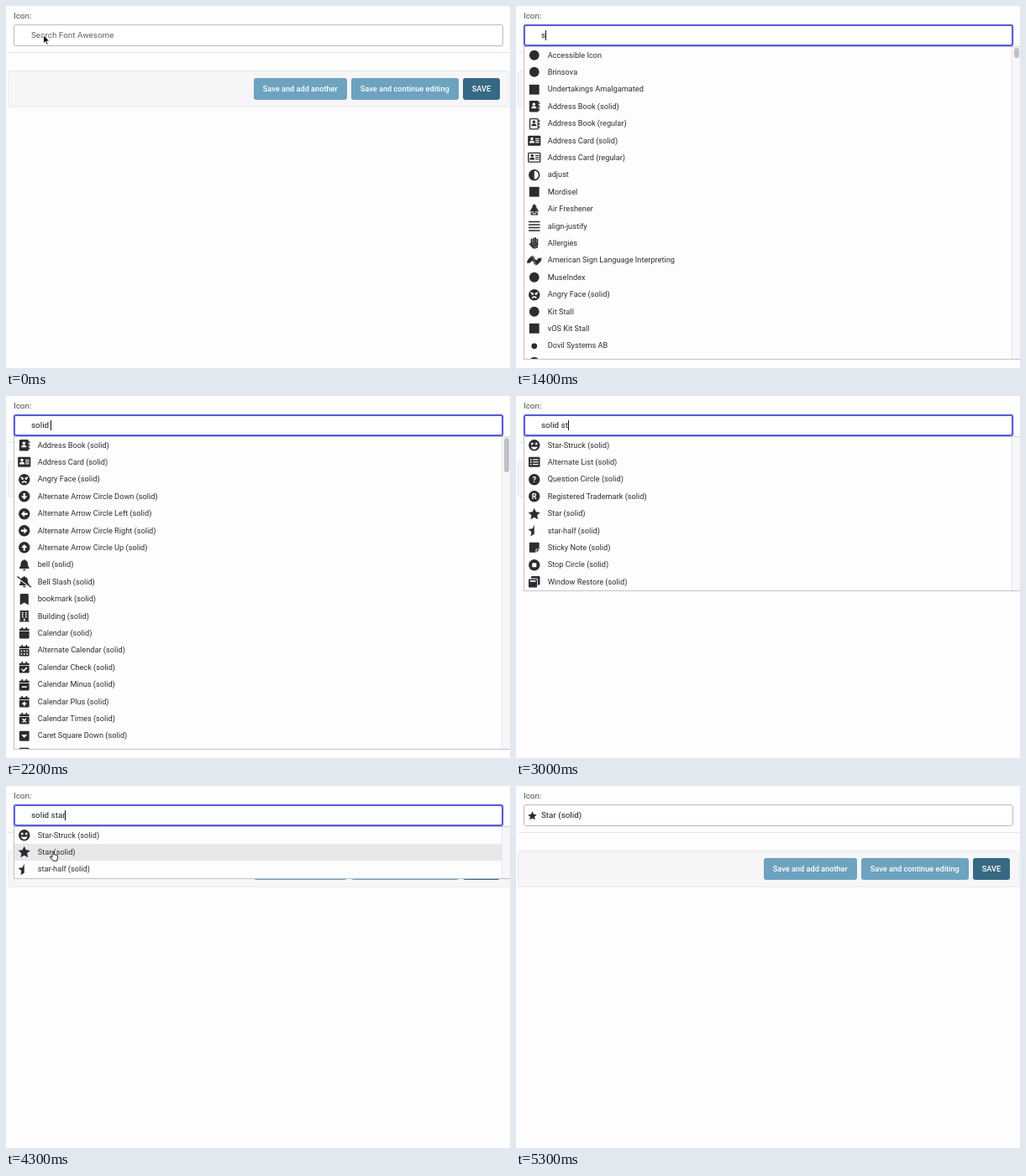
An HTML page that plays this animation: 600x432 px, repeating every 6400 ms.

```html
<!DOCTYPE html>
<html lang="en">
<head>
<meta charset="utf-8">
<title>Icon picker</title>
<style>
  :root { --bg: #fefdfe; --ink: #2d2c31; }
  html, body { margin: 0; width: 100%; height: 100%; overflow: hidden; background: var(--bg); }
  body { font: 9.2px/20.4px Roboto, sans-serif; color: var(--ink); }
  #stage { position: relative; width: 600px; height: 432px; overflow: hidden; }
  #stage div, #stage > svg { position: absolute; box-sizing: border-box; }
  #stage div { white-space: pre; }
  svg { overflow: visible; fill: var(--ink); stroke: none; }
  .cut { fill: var(--bg); }
  .line { fill: none; stroke: var(--ink); stroke-width: 1.6; stroke-linecap: round; stroke-linejoin: round; }
  .slit { fill: none; stroke: var(--bg); stroke-width: 1.8; stroke-linecap: round; stroke-linejoin: round; }
  svg text { font: 700 11px Roboto, sans-serif; text-anchor: middle; }

  #label { left: 9px; top: 2px; font-size: 9.9px; color: #4d4b51; }
  #field { left: 9px; top: 22px; width: 583px; height: 26px; border: 1px solid #bbb8c0; border-radius: 3px; background: #fff; }
  .focus #field { border: 2px solid #5a5ed6; box-shadow: 0 0 0 1px rgba(90, 94, 214, .2); }
  #value { left: 30px; top: 25px; font-size: 9.9px; color: #1a191d; }
  #value.hint { color: #5e5c63; }
  #caret { top: 29px; width: 1px; height: 12px; background: #111; }
  #pick { left: 14px; top: 29.7px; }
  #rule { left: 2px; top: 55px; width: 597px; height: 1px; background: #e7e5e9; }
  #bar { left: 2px; top: 77px; width: 597px; height: 44px; background: #f6f5f7; border: 1px solid #ebeaec; border-radius: 3px; }
  .btn { top: 86px; height: 25.5px; line-height: 25.5px; border-radius: 3px; background: #6da3bf; color: #fff; font-weight: 500; text-align: center; }
  .btn.main { background: #376984; }

  #menu { left: 9px; top: 48px; width: 600px; overflow: hidden; background: var(--bg); border: 1px solid #c3c1c6; border-top-color: #d4d2d7; }
  .row { left: 0; width: 580.5px; height: 20.4px; padding-left: 27.7px; }
  .row.on { background: #e9e7e9; --bg: #e9e7e9; }
  .row svg { position: absolute; left: 5.3px; top: 3.5px; }
  #track { left: 580px; top: 0; width: 11px; height: 100%; background: #f7f6f8; border-left: 1px solid #e8e6e9; }
  #thumb { left: 583px; top: 1px; width: 6px; border-radius: 3px; background: #c2c0c4; }
</style>
</head>
<body>
<div id="stage">
  <div id="rule"></div>
  <div id="bar"></div>
  <div class="btn" style="left:295px;width:110.5px">Save and add another</div>
  <div class="btn" style="left:411px;width:127.5px">Save and continue editing</div>
  <div class="btn main" style="left:544px;width:44px">SAVE</div>
  <div id="label">Icon:</div>
  <div id="menu"></div>
  <div id="field"></div>
  <svg id="pick" width="11" height="11" viewBox="0 0 16 16"></svg>
  <div id="value"></div>
  <div id="caret"></div>
  <svg id="mouse" width="1" height="1"></svg>
</div>
<script>
const $ = id => document.getElementById(id);
const LOOP = 6400, ROW = 20.4, TOP = 48.5, MAX_H = 372.5;

// Icon parts on a 16-unit grid
const attr = cls => cls ? ` class="${cls}"` : '';
const disc = (x, y, r, cls) => `<circle cx="${x}" cy="${y}" r="${r}"${attr(cls)}/>`;
const box = (x, y, w, h, cls, r = 0) => `<rect x="${x}" y="${y}" width="${w}" height="${h}" rx="${r}"${attr(cls)}/>`;
const path = (d, cls) => `<path d="${d}"${attr(cls)}/>`;
const glyph = (s, y = 12) => `<text x="8" y="${y}" class="cut">${s}</text>`;
const turn = (deg, part) => `<g transform="rotate(${deg} 8 8)">${part}</g>`;
const grid = (xs, ys, part) => ys.map(y => xs.map(x => part(x, y)).join('')).join('');

function star(cx, cy, r, points = 10) {
  let d = '';
  for (let i = 0; i <= points; i++) {
    const a = -Math.PI / 2 - i * Math.PI / 5, k = i % 2 ? r * .48 : r;
    d += `${i ? 'L' : 'M'}${(cx + k * Math.cos(a)).toFixed(2)} ${(cy + k * Math.sin(a)).toFixed(2)}`;
  }
  return d + 'z';
}

const person = (x, y, cls) => disc(x, y, 2, cls) +
  path(`M${x - 3.4} ${y + 6}v-1.2q0-2.2 2.2-2.2h2.4q2.2 0 2.2 2.2v1.2z`, cls);
const tabs = grid([14.3], [2, 6.5, 11], (x, y) => box(x, y, 1.5, 3, '', .5));
const cardLines = cls => grid([9.5], [4.6, 7.2, 9.8], (x, y) => box(x, y, 5.5, 1.3, cls));
const bars = widths => widths.map((w, i) => box(8 - w / 2, .9 + i * 4.1, w, 1.9, '', .4)).join('');
const round = disc(8, 8, 8);
const arrow = deg => round + turn(deg, path('M6.6 3.5h2.8v4.2h3L8 12.5 3.6 7.7h3z', 'cut'));
const bell = path('M8 0q1 0 1 1.2Q13 2 13 6.4q0 3.6 1.8 5.2.6 1.4-.8 1.4H2q-1.400 0-.8-1.400Q3 10 3 6.400 3 2 7 1.200 7 0 8 0zM6 14h4q-.2 2-2 2t-2-2z');
const calendar = box(1, 2, 14, 3, '', 1) + box(4, 0, 2, 3.5, '', .4) + box(10, 0, 2, 3.5, '', .4) +
  path('M1 6h14v8.500q0 1.500-1.500 1.500h-11q-1.500 0-1.500-1.500z');
const caretBox = deg => box(1, 1, 14, 14, '', 1.5) + turn(deg, path('M3.800 6.200h8.400L8 10.800z', 'cut'));
const mark = disc(8, 8, 7);
const tile = box(1, 1, 14, 14);

const hand = box(3, 2, 2.2, 8, '', 1.1) + box(5.7, .6, 2.2, 9, '', 1.1) + box(8.4, 0, 2.2, 9, '', 1.1) +
  box(11.1, 1.8, 2.200, 9, '', 1.1) + path('M3 8h10.300v3.500q0 4.500-4.300 4.500H7.500Q6 16 5 14.500L.4 9.600q.8-1.800 2.600-.3z');
const signHand = path('M0 8.500L4 4l3.500-2 .8 1.200L6 5l4-1.400.5 1.300L7.500 6.500l3.500-.2v1.500L8 8.400l2 .8-.7 1.300-3.300-.8-2.500 2.800H-1z');

// Names in menu order, each with its drawing
const items = [
  ['', ''],
  ['840vx', mark],
  ['Accessible Icon', mark],
  ['Brinsova', mark],
  ['Undertakings Amalgamated', tile],
  ['Ad', box(0, 2, 16, 12, '', 1.5) + `<text x="8" y="11.2" class="cut" style="font-size:9px">Ad</text>`],
  ['Address Book (solid)', box(1, 0, 13, 16, '', 1.5) + tabs + person(7.5, 5, 'cut')],
  ['Address Book (regular)', box(1.8, .8, 11.4, 14.4, 'line', 1) + tabs + person(7.5, 5)],
  ['Address Card (solid)', box(-1, 1, 18, 14, '', 1.5) + person(4.7, 5.3, 'cut') + cardLines('cut')],
  ['Address Card (regular)', box(-.3, 1.7, 16.6, 12.6, 'line', 1) + person(5, 5.3) + cardLines()],
  ['adjust', round + path('M8 2a6 6 0 0 1 0 12z', 'cut')],
  ['Ovq.net', mark],
  ['Kelmu', tile],
  ['Mordisel', tile],
  ['referrallayout', mark],
  ['Air Freshener', path('M8 0l3.500 4h-1.500l3 3.500h-1.500L15 11H9v1.500H7V11H1l3.500-3.500H3L6 4H4.500z') +
    box(3, 12, 10, 4, '', .6) + box(5, 13.4, 6, 1.2, 'cut')],
  ['Belurio', tile],
  ['align-center', bars([9, 16, 9, 16])],
  ['align-justify', bars([16, 16, 16, 16])],
  ['Allergies', hand + [[6, 10], [9, 9.5], [11, 11.500], [7.500, 13], [9.700, 13.500]].map(p => disc(...p, .6, 'cut')).join('')],
  ['American Sign Language Interpreting', `<g transform="translate(-1.500 -1)">${signHand}</g>` +
    turn(180, `<g transform="translate(-1.500 -1)">${signHand}</g>`)],
  ['MuseIndex', mark],
  ['Angry Face (solid)', round + path('M3.500 5l3 1.500M12.500 5l-3 1.500M5.500 12q2.500-2.600 5 0', 'slit') +
    disc(5.3, 7.400, 1, 'cut') + disc(10.7, 7.400, 1, 'cut')],
  ['Kit Stall', mark],
  ['vOS Kit Stall', tile],
  ['Dovil Systems AB', disc(8, 8, 4)],
  ['Alternate Arrow Circle Down (solid)', arrow(0)],
  ['Alternate Arrow Circle Left (solid)', arrow(90)],
  ['Alternate Arrow Circle Right (solid)', arrow(-90)],
  ['Alternate Arrow Circle Up (solid)', arrow(180)],
  ['bell (solid)', bell],
  ['Bell Slash (solid)', bell + path('M-1 2.200L16 15.500', 'slit') + path('M-1.200 .8L17.200 15.200', 'line')],
  ['bookmark (solid)', path('M2 1.500Q2 0 3.500 0h9Q14 0 14 1.500V16l-6-3.500L2 16z')],
  ['Building (solid)', box(2, 0, 12, 15) + box(1, 14.500, 14, 1.5) +
    grid([4.5, 9.3], [2.2, 5.2, 8.2], (x, y) => box(x, y, 2.2, 1.8, 'cut')) + box(7, 11.500, 2, 3.2, 'cut')],
  ['Calendar (solid)', calendar],
  ['Alternate Calendar (solid)', calendar + grid([3, 7, 11], [7.800, 11.800], (x, y) => box(x, y, 2, 2, 'cut'))],
  ['Calendar Check (solid)', calendar + path('M4.800 11l2.200 2.200 4.200-4.200', 'slit')],
  ['Calendar Minus (solid)', calendar + box(4.500, 10, 7, 1.8, 'cut')],
  ['Calendar Plus (solid)', calendar + box(5, 10, 6, 1.900, 'cut') + box(7.05, 8, 1.900, 6, 'cut')],
  ['Calendar Times (solid)', calendar + path('M6 9l4 4M10 9l-4 4', 'slit')],
  ['Caret Square Down (solid)', caretBox(0)],
  ['Caret Square Left (solid)', caretBox(90)],
  ['Star-Struck (solid)', round + path(star(5, 6, 2.5), 'cut') + path(star(11, 6, 2.5), 'cut') +
    path('M3.500 9.800q4.500 1.400 9 0-.7 4-4.500 4t-4.500-4z', 'cut')],
  ['Alternate List (solid)', box(0, 1, 16, 14, '', 1.5) +
    grid([3.200], [4.600, 8, 11.400], (x, y) => disc(x, y, 1.1, 'cut') + box(x + 2.600, y - .7, 8, 1.4, 'cut'))],
  ['Question Circle (solid)', round + glyph('?')],
  ['Registered Trademark (solid)', round + glyph('R')],
  ['Star (solid)', path(star(8, 8.500, 8.800))],
  ['star-half (solid)', path(star(8, 8.500, 8.800, 5))],
  ['Sticky Note (solid)', path('M1 2q0-1 1-1h12q1 0 1 1v8h-4q-1 0-1 1v4H2q-1 0-1-1zM11.200 11H15l-3.800 4z')],
  ['Stop Circle (solid)', round + box(5, 5, 6, 6, 'cut', .5)],
  ['Window Restore (solid)', path('M3.500 3V1.500Q3.500 0 5 0h9.500Q16 0 16 1.500V11q0 1.500-1.500 1.500H13V5q0-2-2-2z') +
    box(0, 4, 12, 12, '', 1.5) + box(2, 6, 8, 2, 'cut')]
];

const pointers = {
  arrow: 'M0 0V10.300L2.400 8.100 4 11.800 5.700 11 4.100 7.500H7.300z',
  hand: 'M1.500 1q1-1.200 1.900.1V4.500q1-.8 1.600.3 1-.6 1.500.5 1.300-.4 1.400.8V8.500L7.100 11.800H2.600L-1.100 7.500q0-1.300 1.200-.8L1.500 7.800z'
};

// [time, value]: each holds until the next
const typing = [[500, ''], [1400, 's'], [1600, 'so'], [1800, 'sol'], [1900, 'soli'], [2000, 'solid'],
  [2200, 'solid '], [2900, 'solid s'], [3000, 'solid st'], [3200, 'solid sta'], [3300, 'solid star']];
const moves = [[0, ['arrow', 44.5, 34.5]], [1400, null], [3900, ['arrow', 45, 41]], [4000, ['hand', 48, 52]],
  [4100, ['hand', 51, 63]], [4200, ['hand', 53, 73]], [4300, ['hand', 53.500, 77.500]],
  [4800, ['arrow', 53.500, 77.500]], [5200, ['arrow', 330, 64]], [5300, null]];
const CLOSE = 4800;
const at = (keys, t) => keys.filter(k => k[0] <= t).pop();

const svg = body => `<svg width="13.5" height="13.5" viewBox="0 0 16 16">${body}</svg>`;

function search(query) {
  const words = query.trim().split(' ');
  return items.filter(([name]) => !query || name && words.every(w => name.toLowerCase().includes(w)));
}

function drawMenu(query, hover) {
  const found = search(query);
  const height = Math.min(found.length * ROW, MAX_H);
  const thumb = query.length < 2 ? 12 : query === 'so' ? 38 : 41;
  $('menu').style.height = height + 1.5 + 'px';
  $('menu').innerHTML = found.map(([name, icon], i) =>
    `<div class="row${i === hover ? ' on' : ''}" style="top:${i * ROW - .5}px">${svg(icon)}${name}</div>`).join('') +
    '<div id="track"></div>' + (height === MAX_H ? `<div id="thumb" style="height:${thumb}px"></div>` : '');
}

let last = '';
function draw(t) {
  const key = at(typing, t);
  const open = !!key && t < CLOSE;
  const query = open ? key[1] : '';
  const mouse = at(moves, t)[1];
  const caretOn = open && (t - key[0]) % 1000 < 500;
  const state = [open, query, mouse, caretOn, t >= CLOSE].join('|');
  if (state === last) return;
  last = state;

  $('stage').className = open ? 'focus' : '';
  $('menu').style.display = open ? '' : 'none';
  const hover = mouse && mouse[0] === 'hand' ? Math.floor((mouse[2] - TOP) / ROW) : -1;
  if (open) drawMenu(query, hover);

  const done = t >= CLOSE;
  $('value').textContent = done ? 'Star (solid)' : query || 'Search Font Awesome';
  $('value').className = done || query ? '' : 'hint';
  $('pick').innerHTML = done ? path(star(8, 8.500, 8)) : '';
  $('caret').style.display = caretOn ? '' : 'none';
  $('caret').style.left = 29.7 + (query ? $('value').getBoundingClientRect().width : 0) + 'px';

  $('mouse').innerHTML = mouse ? `<path transform="translate(${mouse[1]} ${mouse[2]})" d="${pointers[mouse[0]]}"
    fill="${mouse[0] === 'hand' ? '#fff' : '#111'}" stroke="${mouse[0] === 'hand' ? '#111' : '#fff'}" stroke-width=".9"/>` : '';
  $('mouse').style.left = $('mouse').style.top = 0;
}

const start = performance.now();
function tick() {
  draw((performance.now() - start) % LOOP);
  requestAnimationFrame(tick);
}
tick();
</script>
</body>
</html>
```
